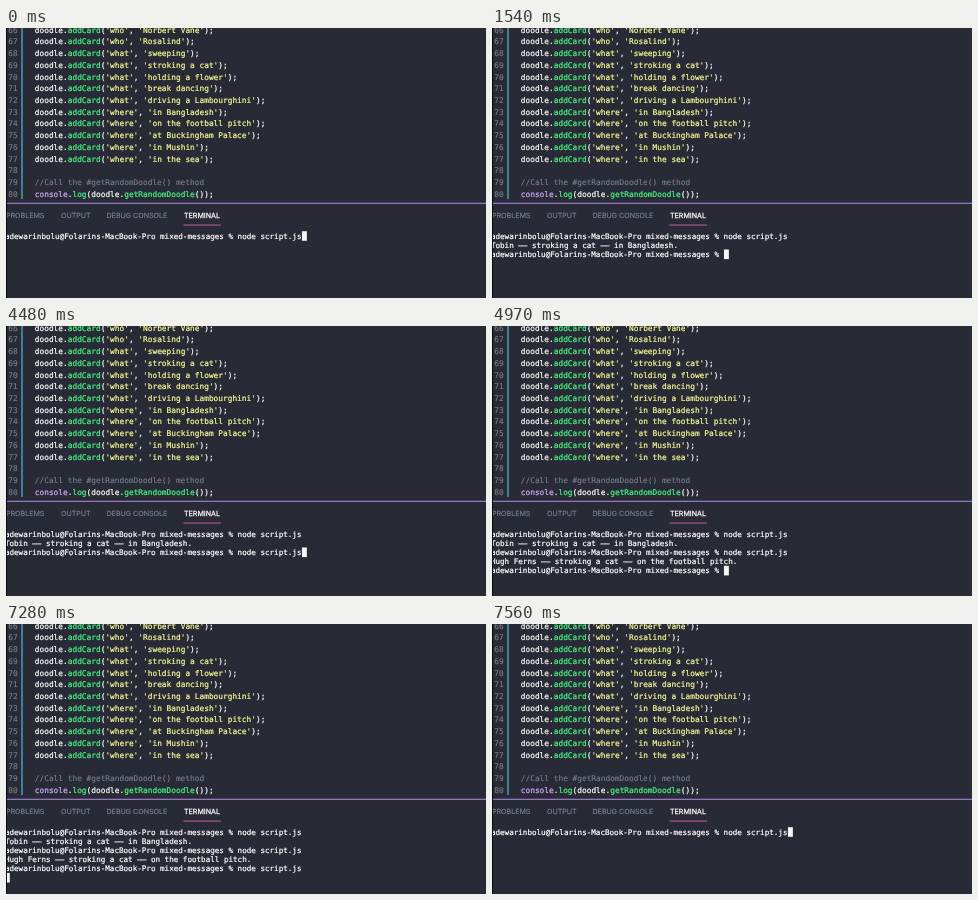
Animation of 480 by 270 pixels, one loop 7.63 s. Source, as an HTML page:

```html
<!DOCTYPE html>
<html lang="en">
<head>
<meta charset="utf-8">
<title>Terminal session</title>
<style>
  html, body { margin: 0; width: 100%; height: 100%; overflow: hidden; background: #282a36; }
  svg { display: block; }
  text { white-space: pre; text-rendering: geometricPrecision; color: #fbfbf6; }
  text, tspan { fill: currentColor; stroke: currentColor; stroke-width: .22px; }
  .code text { font: 7.82px "DejaVu Sans Mono", monospace; }
  .term text { font: 7.59px "DejaVu Sans Mono", monospace; color: #fff; }
  .tabs text { font: 7.1px Inter, sans-serif; color: #7d8090; stroke-width: .12px; }
  .tabs .on { color: #fff; stroke-width: .25px; }
  .code .num { color: #7d808c; stroke-width: .1px; }
  .fn { color: #45f582; }
  .str { color: #f5fa94; }
  .obj { color: #cdaaf8; }
  .note { color: #7c808e; stroke-width: .1px; }
</style>
</head>
<body>
<svg width="480" height="270" viewBox="0 0 480 270">
  <rect width="480" height="270" fill="#282a36"/>
  <rect x="15.1" width="1.8" height="171" fill="#43899d"/>
  <g class="code" id="code"></g>
  <rect y="174.7" width="480" height="1.3" fill="#9476c0"/>
  <g class="tabs">
    <text x="0" y="190.1">PROBLEMS</text>
    <text x="55" y="190.1">OUTPUT</text>
    <text x="100.5" y="190.1">DEBUG CONSOLE</text>
    <text x="178" y="190.1" class="on">TERMINAL</text>
    <rect x="177.5" y="196.5" width="37.5" height="1.1" fill="#b3588f"/>
  </g>
  <g class="term" id="term"></g>
  <rect id="cursor" width="4.9" height="9.6" fill="#f6f6f6"/>
  <rect width="1" height="270" fill="#08090c"/>
</svg>
<script>
const LOOP = 7630, RESET = 7560;
const CHAR = 4.57, ROW = 9.15, LEFT = -1.1, BASE = 210.6;
const $ = id => document.getElementById(id);

// Editor
const span = (cls, s) => `<tspan class="${cls}">${s}</tspan>`;
const cards = [
  ['who', 'Norbert Vane'], ['who', 'Rosalind'],
  ['what', 'sweeping'], ['what', 'stroking a cat'], ['what', 'holding a flower'],
  ['what', 'break dancing'], ['what', 'driving a Lambourghini'],
  ['where', 'in Bangladesh'], ['where', 'on the football pitch'],
  ['where', 'at Buckingham Palace'], ['where', 'in Mushin'], ['where', 'in the sea']
];
const code = [
  ...cards.map(([kind, value]) =>
    `doodle.${span('fn', 'addCard')}(${span('str', `'${kind}'`)}, ${span('str', `'${value}'`)});`),
  '',
  span('note', '//Call the #getRandomDoodle() method'),
  `${span('obj', 'console')}.${span('fn', 'log')}(doodle.${span('fn', 'getRandomDoodle')}());`
];
$('code').innerHTML = code.map((line, i) => {
  const y = 4.6 + i * 11.73;
  return `<text class="num" x="2.2" y="${y}">${66 + i}</text><text x="28.8" y="${y}">${line}</text>`;
}).join('');

// Terminal: each run is recalled, entered and then answered
const prompt = 'adewarinbolu@Folarins-MacBook-Pro mixed-messages % ';
const command = 'node script.js';
const runs = [
  { type: 0, enter: 980, reply: 1120, out: 'Tobin —— stroking a cat —— in Bangladesh.' },
  { type: 3850, enter: 4830, reply: 4970, out: 'Hugh Ferns —— stroking a cat —— on the football pitch.' },
  { type: 6510, enter: 7280, reply: 7420, out: 'Rosalind —— sweeping —— in the sea.' }
];

function terminalLines(t) {
  const lines = [prompt];
  for (const run of runs) {
    if (t >= run.type) lines[lines.length - 1] += command;
    if (t >= run.enter) lines.push('');
    if (t >= run.reply) lines.splice(-1, 1, run.out, prompt);
  }
  return lines;
}

let shown = '';
function draw(t) {
  const lines = terminalLines(t < RESET ? t : 0);
  const key = lines.join('\n');
  if (key === shown) return;
  shown = key;
  $('term').innerHTML = lines.map((line, i) =>
    `<text x="${LEFT}" y="${BASE + i * ROW}">${line}</text>`).join('');
  const last = lines.length - 1;
  $('cursor').setAttribute('x', LEFT + lines[last].length * CHAR);
  $('cursor').setAttribute('y', BASE - 7.4 + last * ROW);
}

const start = performance.now();
function tick() {
  draw((performance.now() - start) % LOOP);
  requestAnimationFrame(tick);
}
tick();
</script>
</body>
</html>
```
